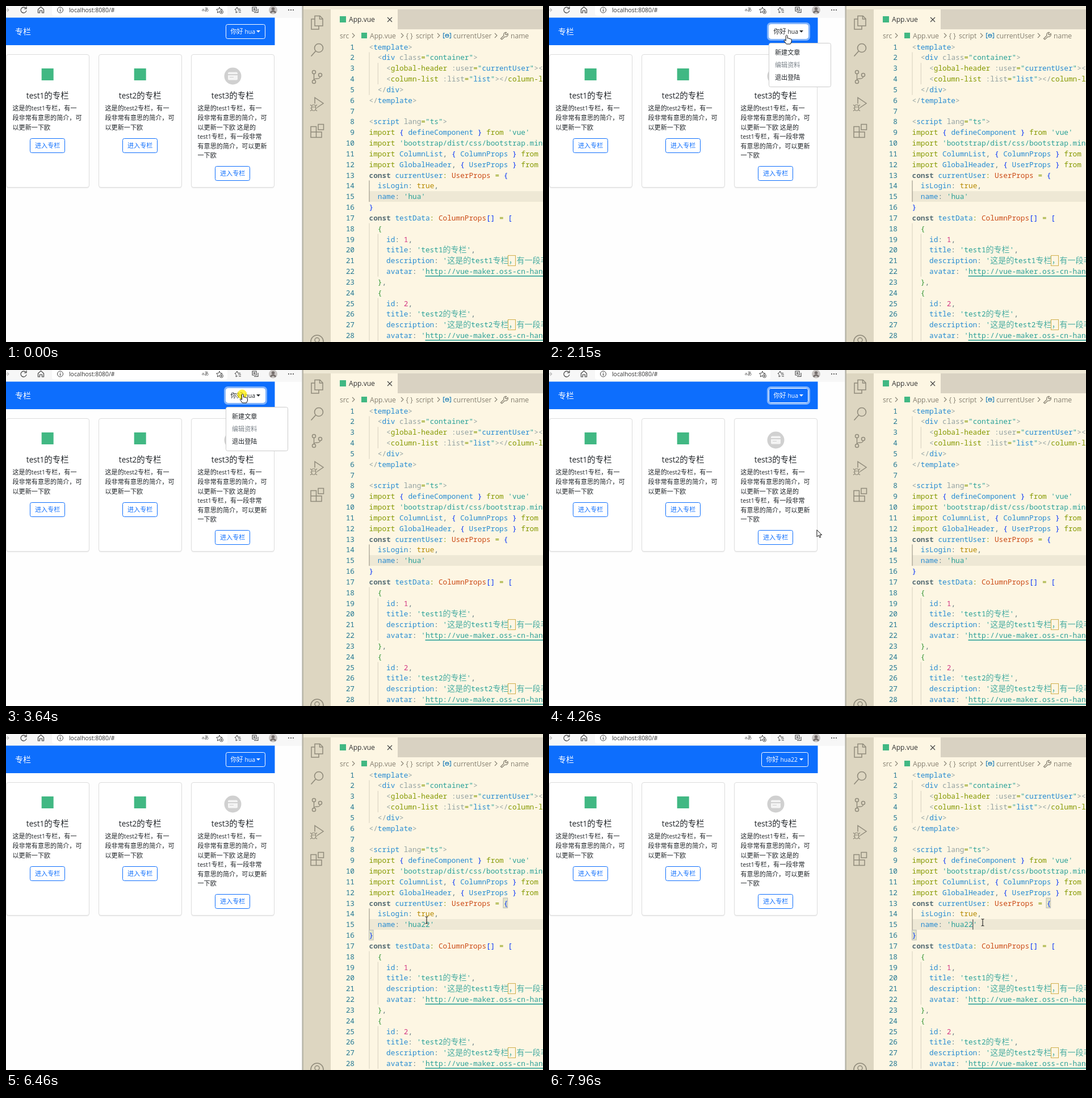
These frames come from a looping animation (946 by 592 pixels, 7.99 s). An HTML page:

```html
<!DOCTYPE html>
<html lang="zh-CN">
<head>
<meta charset="utf-8">
<title>专栏</title>
<style>
html, body { margin: 0; width: 100%; height: 100%; overflow: hidden; background: #fff; }
svg { display: block; }
text { white-space: pre; }
.ui { font-family: "Open Sans", "Noto Sans", sans-serif; }
.cjk { font-family: "Noto Sans CJK SC", "Noto Sans CJK", sans-serif; }
.light { font-weight: 300; fill-opacity: .85; }
.mono { font-family: "Noto Sans Mono", "DejaVu Sans Mono", monospace; }
</style>
</head>
<body>
<svg id="stage" width="946" height="592" viewBox="0 0 946 592"></svg>
<script>
const LOOP = 7990, BLUE = '#0d6efd', GREEN = '#41b883';
const stage = document.getElementById('stage');
const $ = id => document.getElementById(id);

// ---- markup helpers ----
const esc = s => s.replace(/&/g, '&amp;').replace(/</g, '&lt;');
const rect = (x, y, w, h, fill, more = '') =>
  `<rect x="${x}" y="${y}" width="${w}" height="${h}" fill="${fill}" ${more}/>`;
const path = (d, stroke, width = 1.2, more = '') =>
  `<path d="${d}" fill="none" stroke="${stroke}" stroke-width="${width}" ${more}/>`;
const circle = (x, y, r, fill, more = '') =>
  `<circle cx="${x}" cy="${y}" r="${r}" fill="${fill}" ${more}/>`;

// Latin and Chinese runs get their own family and size.
function runs(s, size, mono) {
  return s.match(/[\u2e80-\uffff]+|[^\u2e80-\uffff]+/g).map(r => {
    const wide = r.charCodeAt(0) >= 0x2e80;
    const cls = wide ? (mono ? 'cjk light' : 'cjk') : mono ? 'mono' : 'ui';
    const px = wide ? size : size * (mono ? 0.911 : 0.945);
    return `<tspan class="${cls}" font-size="${px}">${esc(r)}</tspan>`;
  }).join('');
}
// y is the middle of the line
const text = (x, y, s, size, fill, more = '') =>
  `<text x="${x}" y="${y + size * 0.36}" fill="${fill}" ${more}>${runs(s, size)}</text>`;

// ---- browser ----
function toolbar() {
  const c = '#444';
  return rect(0, 0, 521, 21, '#f7f7f7') + rect(81, -8, 309, 25, '#fff', 'rx="4"') +
    path('M0 7H5M2 4L5 7L2 10', '#bbb') +
    path('M35 4A5 5 0 1 0 36 8M36 1V5H32', c) +
    path('M56.5 6L61.5 1.5L66.5 6V12H63.5V8H59.5V12H56.5Z', c) +
    circle(95.5, 7, 5, 'none', `stroke="${c}"`) + path('M95.5 6V10M95.5 4V5', c) +
    text(111, 7, 'localhost:8080/#', 11, '#333') +
    text(345, 6, 'aあ', 8, c) +
    path('M376 2L377.5 5.5L381 6L378 8.5L379 12L376 10L372.5 12L373 8.5L370.5 6L374.5 5.5Z', c, 1) +
    circle(379.5, 10.5, 3, '#fff', `stroke="${c}"`) + path('M378 10.5H381M379.5 9V12', c, 1) +
    path('M407 2L408.5 5.5H413M407 2L405 5.5L403 6L405.5 8.5L405 12L408 10.5M409 8H414M410 11H414', c, 1) +
    path('M434 9V2H441V9ZM437 11.5H444V5M437.5 3.5V7.5M435.5 5.5H439.5', c, 1.1) +
    circle(470.5, 7, 7.5, '#c9c5c3') + circle(470.5, 5, 2.8, '#77706e') +
    path('M466 12Q470.5 6 475 12', '#77706e', 3) +
    [498, 502, 506].map(x => circle(x, 7, 1.1, c)).join('');
}

function card(i) {
  const x = [0.5, 163.5, 326.5][i], mid = x + 72.7, n = i + 1, third = i === 2;
  const lines = [`这是的test${third ? 1 : n}专栏，有一`, '段非常有意思的简介，可', '以更新一下欧'];
  if (third) {
    lines[2] += ' 这是的';
    lines.push('test1专栏，有一段非常', '有意思的简介，可以更新', '一下欧');
  }
  const top = third ? 282.5 : 233.5;
  const picture = third
    ? circle(399.5, 123.5, 15, '#d0d0d0') + rect(391, 116.5, 17, 14, '#f4f4f4', 'rx="2"') +
      rect(391, 120, 17, 2, '#d0d0d0') + rect(394, 125, 7, 1, '#d0d0d0')
    : rect(mid - 10.5, 110, 21, 21, GREEN);
  return rect(x, 87, 146, 234.5, '#000', 'rx="4" opacity=".05"') +
    rect(x, 85.5, 146, 234, '#fff', 'rx="3.5" stroke="#dcdcdc"') + picture +
    text(mid, 158, `test${n}的专栏`, 14.4, '#212529', 'text-anchor="middle"') +
    lines.map((s, k) => text(x + 11, 180.5 + k * 16.55, s, 11.1, '#212529')).join('') +
    rect(Math.round(mid - 31) + 0.5, top, 61, 25, '#fff', `rx="3" stroke="${BLUE}"`) +
    text(mid, top + 12.5, '进入专栏', 11.1, BLUE, 'text-anchor="middle"');
}

const page = () => rect(0, 0, 522, 592, '#fefefe') + toolbar() +
  rect(0, 20.5, 473.5, 48.5, BLUE) + text(16, 44.5, '专栏', 14, '#fff') +
  [0, 1, 2].map(card).join('') +
  rect(385.5, 30.5, 73, 29, 'none', 'id="ring" rx="5" stroke="#f8f9fa" stroke-width="3"') +
  rect(0, 32.5, 0, 25, '#fff', 'id="btn" rx="3" stroke="#fff"') +
  '<text id="hello" y="49"></text><path id="arrow" d="M441 43H448L444.5 46.8Z"/>' +
  '<g id="menu">' + rect(387.5, 65.5, 109, 77, '#fff', 'rx="3" stroke="#ccc"') +
  ['新建文章', '编辑资料', '退出登陆'].map((s, i) =>
    text(398, 82 + i * 22.2, s, 11.1, i === 1 ? '#7a8289' : '#212529')).join('') + '</g>';

// ---- editor ----
const X0 = 639.5, CHAR = 7.65;
const rowY = n => 72 + (n - 1) * 18.83;
const ink = { p: '#93a1a1', b: '#268bd2', s: '#2aa198', g: '#859900', u: '#0431fa', n: '#319331',
  k: '#586e75', o: '#cb4b16', y: '#b58900', d: '#657b83', m: '#d33682' };

// "~x" switches to ink x
const code = s => s.split('~').map((part, i) => {
  if (!i) return part && runs(part, 14, true);
  const key = part[0];
  return `<tspan fill="${ink[key]}"${key === 'k' ? ' font-weight="bold"' : ''}>${runs(part.slice(1), 14, true)}</tspan>`;
}).join('');

const item = n => ['  ~n{', `    ~bid~d: ~m${n}~d,`, `    ~btitle~d: ~s'test${n}的专栏'~d,`,
  `    ~bdescription~d: ~s'这是的test${n}专栏，有一段非`,
  "    ~bavatar~d: ~s'http://vue-maker.oss-cn-hang", '  ~n}~d,'];
const nameLine = name => `  ~bname~d: ~s'${name}'`;
const program = [
  '~p<~btemplate~p>',
  '  ~p<~bdiv ~pclass~g=~s"container"~p>',
  '    ~p<~gglobal-header ~p:user~g=~s"~bcurrentUser~s"~p></',
  '    ~p<~gcolumn-list ~p:list~g=~s"~blist~s"~p></~gcolumn-li',
  '  ~p</~bdiv~p>', '~p</~btemplate~p>', '',
  '~p<~bscript ~plang~g=~s"ts"~p>',
  "~gimport ~u{ ~bdefineComponent ~u} ~gfrom ~s'vue'",
  "~gimport ~s'bootstrap/dist/css/bootstrap.min",
  '~gimport ~bColumnList~d, ~u{ ~bColumnProps ~u} ~gfrom',
  '~gimport ~bGlobalHeader~d, ~u{ ~bUserProps ~u} ~gfrom',
  '~kconst ~bcurrentUser~g: ~oUserProps ~g= ~u{',
  '  ~bisLogin~d: ~ytrue~d,', nameLine('hua'), '~u}',
  '~kconst ~btestData~g: ~oColumnProps~u[] ~g= ~u[',
  ...item(1), ...item(2).slice(0, 5)];

const guide = (col, a, b, c = '#d5cfbf') =>
  rect(X0 + col * CHAR, rowY(a) - 9.4, 1, (b - a + 1) * 18.83, c);
const bracket = (x, n) => rect(x, rowY(n) - 9, 7.6, 17.5, '#e3e6c8', 'stroke="#b9b9b9"');

function activityBar() {
  const c = '#908b7b';
  return rect(524, 6, 48, 586, '#ddd6c1') +
    path('M544 17.5H553L558 22.5V35H544ZM552.5 17.5V23H558M544 23H538V41H551V35', c, 1.5) +
    circle(551, 74, 7.5, 'none', `stroke="${c}" stroke-width="1.6"`) + path('M545.5 79.5L537.5 88.5', c, 1.7) +
    [[542.5, 116.5], [542.5, 133.5], [553.5, 121.5]].map(([x, y]) =>
      circle(x, y, 3, 'none', `stroke="${c}" stroke-width="1.5"`)).join('') +
    path('M542.5 119.5V130.5M553.5 124.5Q553 128 548 128Q543 128 542.5 130', c, 1.5) +
    path('M544 172V161.5L559 171.5L548 179', c, 1.5) +
    path('M538.5 177.5A3.5 3.5 0 0 1 545.5 177.5V181A3.5 3.5 0 0 1 538.5 181ZM538.5 178H545.5M536 174L539 176.5M548 174L545 176.5M536 180H538.5M545.5 180H548M536 185L539 182.5M548 185L545 182.5', c, 1.2) +
    path('M537 212.5H546.5V231.5H537ZM537 222H556V231.5H546M550 208.5H559.5V218H550Z', c, 1.5) +
    circle(548, 591, 11, 'none', `stroke="${c}" stroke-width="1.6"`) +
    circle(548, 588.5, 4, 'none', `stroke="${c}" stroke-width="1.5"`);
}

function crumbs() {
  const c = '#857f70', y = 52;
  const word = (x, s) => text(x, y, s, 12.8, c);
  return word(588, 'src') + rect(626, 47, 10, 10, GREEN) + word(641, 'App.vue') +
    word(704.5, '{ }') + word(722, 'script') + word(788, 'currentUser') + word(889, 'name') +
    [610, 696, 760, 861].map(x => path(`M${x} 48L${x + 4} 52L${x} 56`, c, 1.1)).join('') +
    path('M773 48H770.5V56.5H773M781 48H783.5V56.5H781M774 51L777 49.5L780 51V54L777 55.5L774 54ZM774 51L777 52.5L780 51', '#1478b8', 1.1) +
    path('M871.5 57.5L877 52A4 4 0 0 1 881.5 46.5L879.5 49.5L881.5 51L884 48.5A4 4 0 0 1 879 54L873.5 59Z', c, 1.2);
}

const editor = () => rect(521, 0, 1, 592, '#d0d0cc') + rect(522, 0, 2, 592, '#b9b6a8') +
  rect(524, 0, 422, 6, '#eee8d5') +
  activityBar() + rect(572, 6, 374, 586, '#fdf6e3') + rect(690, 6, 256, 35, '#d9d2c2') +
  rect(588, 18, 11, 11, GREEN) + text(604, 23.5, 'App.vue', 12.8, '#333') +
  path('M672 20L680 28M680 20L672 28', '#444', 1.2) + crumbs() +
  rect(640, rowY(15) - 9.4, 306, 18.83, '#eee8d5') +
  guide(0, 2, 5) + guide(2, 3, 4) + guide(0, 14, 15, '#8d8a7e') +
  guide(0, 18, 28) + guide(2, 19, 22) + guide(2, 25, 28) +
  '<g id="match">' + bracket(876, 13) + bracket(639.5, 16) + '</g>' +
  program.map((s, i) => {
    const n = i + 1, y = rowY(n) + 4.6;
    return `<text x="614" y="${y}" text-anchor="end" fill="#237893">${runs('' + n, 14, true)}</text>` +
      `<text id="row${n}" x="${X0}" y="${y}">${s && code(s)}</text>`;
  }).join('') +
  [21, 27].map(n => rect(884.5, rowY(n) - 9, 13, 18, 'none', 'stroke="#cfae4a"')).join('') +
  [22, 28].map(n => rect(738.5, Math.round(rowY(n) + 8), 208, 1.6, ink.s)).join('') +
  rect(0, rowY(15) - 9, 1.3, 18, '#4d5a5e', 'id="caret"');

const pointers = circle(0, 0, 8.5, '#ffee00', 'id="press" opacity=".75"') +
  '<g id="pointer">' +
  '<path id="select" d="M0 0V12L3 9.5L5 13.5L6.8 12.7L5 8.8H8.7Z" fill="#fff" stroke="#111"/>' +
  '<path id="hand" d="M-1.5 1.5Q0 -1 1.5 1.5V6Q3 5 4.3 6.5Q5.5 5.7 6.5 7Q8.5 6.7 8.5 8.5V12L6.5 16H-.5L-4.5 10.5Q-5 8.5 -3 9L-1.5 10.5Z" fill="#fff" stroke="#111"/>' +
  path('M-2.5 -6H-1L0 -5L1 -6H2.5M0 -5V5M-2.5 6H-1L0 5L1 6H2.5', '#222', 1.1, 'id="beam"') + '</g>';

stage.innerHTML = page() + editor() + pointers;

// ---- motion ----
const route = [[140, 898, 588], [380, 640, 500], [600, 318, 330], [760, 350, 150], [920, 430, 50],
  [1670, 430, 50], [1730, 427, 51], [2080, 427, 51], [2240, 407, 51], [2400, 407, 51],
  [2560, 356, 77], [2850, 356, 77], [3180, 417, 50], [3210, 417, 50], [3450, 417, 42], [3940, 417, 42],
  [4200, 450, 220], [4450, 570, 480], [4600, 680, 470], [4720, 721, 345], [4930, 731, 337],
  [6060, 731, 337], [6230, 741, 328], [6460, 741, 328], [6850, 600, 160], [7230, 457, 72],
  [7380, 457, 72], [7600, 560, 400], [7730, 690, 494], [7870, 772, 400], [7960, 764, 332], [7990, 764, 332]];

// Hermite curve through the route, at rest wherever the pointer pauses
function slope(i, k) {
  const a = route[i - 1], p = route[i], b = route[i + 1];
  const still = q => q[1] === p[1] && q[2] === p[2];
  return !a || !b || still(a) || still(b) ? 0 : (b[k] - a[k]) / (b[0] - a[0]);
}
function pointerAt(t) {
  const i = Math.max(1, route.findIndex(p => p[0] > t));
  const a = route[i - 1], b = route[i], d = b[0] - a[0], u = Math.max(0, (t - a[0]) / d);
  return [1, 2].map(k => {
    const e = u * u * (3 - 2 * u);
    return a[k] + (b[k] - a[k]) * e + d * u * (1 - u) * ((1 - u) * slope(i - 1, k) - u * slope(i, k));
  });
}

const during = (t, spans) => spans.some(([a, b]) => t >= a && t < b);
const clamp = v => Math.min(1, Math.max(0, v));
const fade = (t, spans) =>
  Math.max(...spans.map(([a, b]) => Math.min(clamp((t - a) / 150), clamp(1 - (t - b) / 150))));
const show = (id, on) => $(id).setAttribute('visibility', on ? 'visible' : 'hidden');
const set = (id, attrs) => { for (const k in attrs) $(id).setAttribute(k, attrs[k]); };

const presses = [[1190, 1420], [2600, 2780], [3250, 3420], [3590, 3690], [4980, 5180]];
const opened = [[1420, 2780], [3420, 3690]];
const hovered = [[870, 2470], [3050, 3980]];
const focused = [[1190, 2600], [3250, 5080]];

function draw(t) {
  const saved = t >= 6620, left = saved ? 374.5 : 387.5;
  const hover = fade(t, hovered);
  const mix = c => Math.round(255 + (c - 255) * hover);
  const fill = `rgb(${mix(33)},${mix(37)},${mix(41)})`;
  set('btn', { x: left, width: 456.5 - left, 'fill-opacity': hover });
  set('ring', { opacity: 0.5 * fade(t, focused) });
  set('hello', { x: left + 8, fill });
  set('arrow', { fill });
  $('hello').innerHTML = runs('你好 hua' + (saved ? '22' : ''), 11.1);
  show('menu', during(t, opened));

  const typed = t < 5470 ? 0 : t < 5620 ? 1 : 2;
  $('row15').innerHTML = code(nameLine('hua' + '2'.repeat(typed)));
  show('match', t >= 5200);
  set('caret', { x: X0 + (12 + typed) * CHAR - 0.5 });
  show('caret', t >= 5200 && (t < 5620 || Math.floor((t - 5620) / 500) % 2 === 0));

  const [x, y] = pointerAt(t);
  const visible = t >= 140 && !during(t, [[5470, 6060]]);
  const onButton = x > left && x < 457 && y > 32 && y < 58;
  const kind = x > 572 && y > 62 ? 'beam' : onButton ? 'hand' : 'select';
  for (const id of ['beam', 'hand', 'select']) show(id, visible && id === kind);
  set('pointer', { transform: `translate(${x} ${y})` });
  set('press', { cx: x - 1, cy: y + 1 });
  show('press', during(t, presses));
}

function tick(now) {
  draw(now % LOOP);
  requestAnimationFrame(tick);
}
draw(0);
requestAnimationFrame(tick);
</script>
</body>
</html>
```
